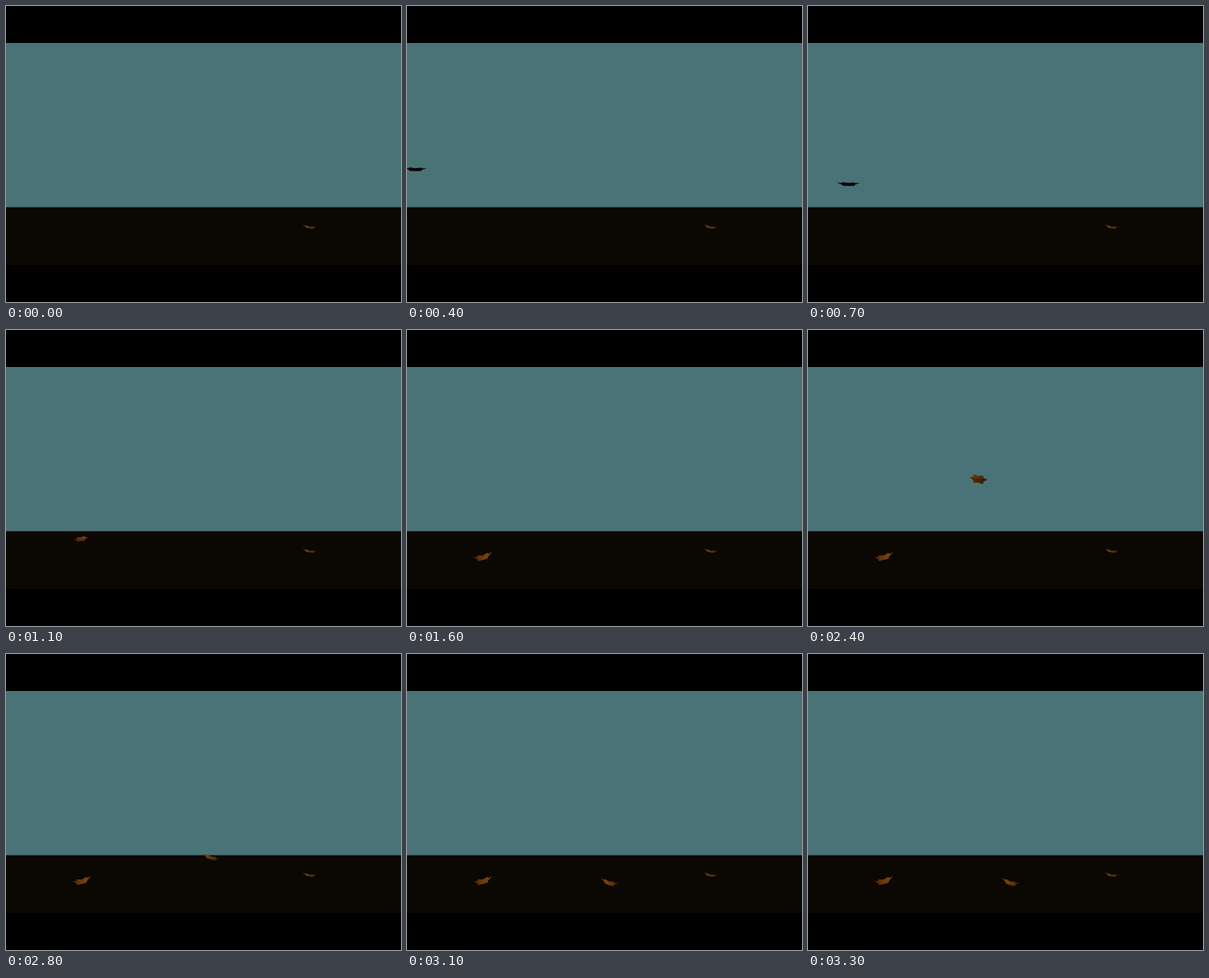
Write an HTML page with a canvas that moves like this. It is 480x360 px and loops after 3400 ms.

```html
<!DOCTYPE html>
<html lang="en">
<head>
<meta charset="utf-8">
<title>Falling leaves</title>
<style>
html, body { margin: 0; width: 100%; height: 100%; overflow: hidden; background: #000; }
canvas { display: block; width: 480px; height: 360px; }
</style>
</head>
<body>
<canvas id="stage" width="480" height="360"></canvas>
<script>
const ctx = document.getElementById('stage').getContext('2d');
const LOOP = 3400, STEP = 100, CORNERS = 12;
const TIP = [150, 104, 24], BODY = [142, 74, 15], FAR = [84, 46, 10];

// w, h: half size; curl lifts both ends; lean > 0 lifts the left end.
const poses = {
  flat: { w: 14, h: 2.5, curl: 2, lean: 0.2, light: 0.1 },
  tilt: { w: 9, h: 3.2, curl: 0.5, lean: -1.5, light: 0.8 },
  restLeft: { w: 11.5, h: 4, curl: 4, lean: -3, light: 1 },
  spread: { w: 11.5, h: 9.5, curl: 1, lean: 0.2, light: 0.4 },
  glide: { w: 10.5, h: 2.6, curl: 1.8, lean: 3, light: 0.9 },
  restMid: { w: 10.5, h: 3.2, curl: 4, lean: 3, light: 1 },
  restRight: { w: 9, h: 1.6, curl: 3, lean: 1.5, light: 0.9 }
};

const key = (t, x, y, name) => ({ t, x, y, ...poses[name] });
const leaves = [
  [key(0, 369, 268, 'restRight')],
  [key(200, -16, 186, 'flat'), key(700, 49, 216, 'flat'),
   key(1100, 91, 254, 'tilt'), key(1300, 92, 275, 'restLeft')],
  [key(1600, 125, 31, 'spread'), key(2000, 165, 115, 'spread'),
   key(2800, 249, 247, 'glide'), key(3100, 246, 277, 'restMid')]
];

function sample(keys, t) {
  if (t < keys[0].t) return null;
  const next = keys.findIndex(k => k.t > t);
  if (next < 0) return keys[keys.length - 1];
  const a = keys[next - 1], b = keys[next];
  const k = (t - a.t) / (b.t - a.t);
  return Object.fromEntries(Object.keys(a).map(n => [n, a[n] + (b[n] - a[n]) * k]));
}

// A star of lobes, squashed by the view and bent along its length.
function outline({ w, h, curl, lean }) {
  return Array.from({ length: CORNERS }, (_, i) => {
    const angle = i / CORNERS * 2 * Math.PI;
    const r = i % 2 ? 0.68 : 1;
    const u = r * Math.cos(angle);
    return [u * w, r * Math.sin(angle) * h + lean * u + curl * (0.5 - u * u)];
  });
}

function fillPath(pts, fill) {
  ctx.beginPath();
  pts.forEach(p => ctx.lineTo(...p));
  ctx.closePath();
  ctx.fillStyle = fill;
  ctx.fill();
}

function drawLeaf(leaf) {
  const pts = outline(leaf);
  const lit = leaf.lean < 0 ? leaf.w : -leaf.w;
  const shade = ctx.createLinearGradient(lit, 0, -lit, 0);
  [TIP, BODY, FAR].forEach((c, i) =>
    shade.addColorStop(i / 2, `rgb(${c.map(v => Math.round(v * leaf.light))})`));
  ctx.save();
  ctx.translate(leaf.x, leaf.y);
  fillPath(pts, shade);
  fillPath(pts.slice(0, CORNERS / 2 + 1), 'rgba(0,0,0,.22)');
  ctx.restore();
}

function band(color, top, bottom) {
  ctx.fillStyle = color;
  ctx.fillRect(0, top, 480, bottom - top);
}

function draw(t) {
  band('#4a7378', 45, 245);
  band('#0b0702', 244.7, 315);
  leaves.map(keys => sample(keys, t)).filter(Boolean).forEach(drawLeaf);
  band('#000', 0, 45);
  band('#000', 315, 360);
}

function tick() {
  draw(Math.floor(performance.now() % LOOP / STEP) * STEP);
  requestAnimationFrame(tick);
}
tick();
</script>
</body>
</html>
```
